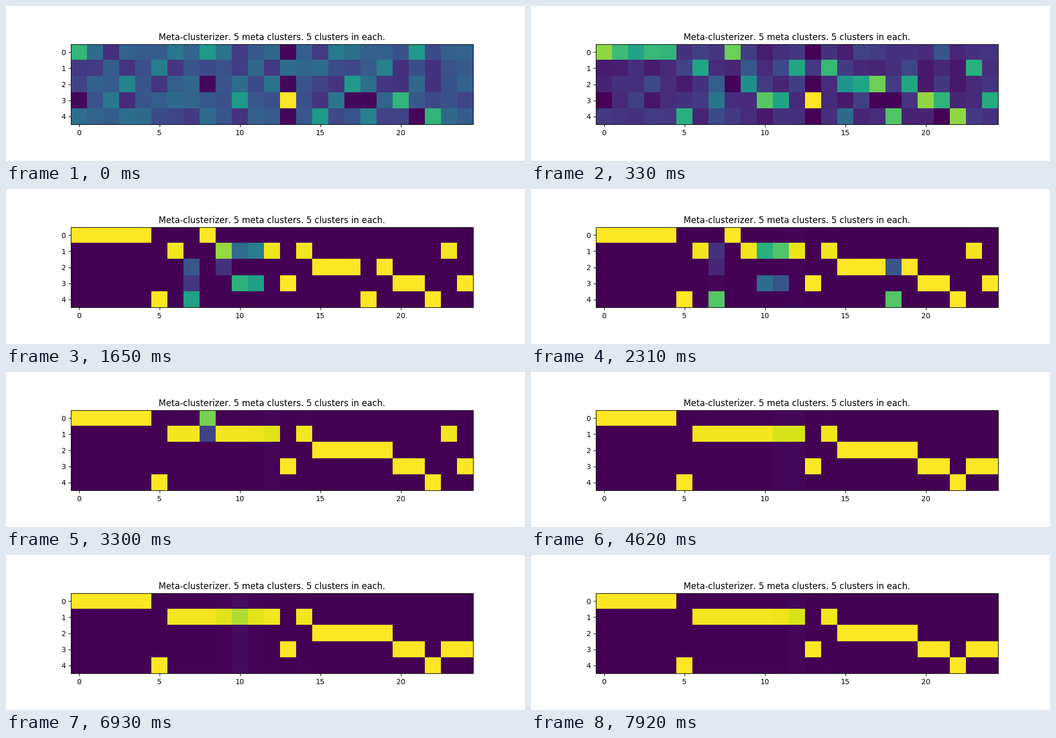
Recreate the animation shown at these times as a matplotlib script. Size 1000 px wide and 300 px high, loop 8 s.

```python
import numpy as np
import matplotlib.pyplot as plt
from matplotlib.animation import FuncAnimation

LOOP_MS = 8000
INTERVAL = 40
STEP_MS = 330
ROWS, COLS = 5, 25
COLUMN_SUM = 1.41  # of the untrained weights, in colour range units
FORMED = 3  # step at which the clusters have formed

plt.rcParams["text.kerning_factor"] = 6

# Standout (row, column) cells before training, by weight.
STANDOUT = {
    1.00: [(3, 13)],
    0.66: [(0, 0), (3, 20), (4, 22)],
    0.54: [(0, 8), (0, 21), (2, 17), (3, 10), (4, 15)],
    0.02: [(3, 0), (0, 13), (4, 13), (2, 8), (2, 13), (3, 17), (3, 18),
           (4, 21)],
}

# Meta cluster of each column once the clusters have formed.
FIRST = [0] * 5 + [4, 1, 3, 0, 2, 3, 3, 1, 3, 1, 4, 2, 2, 4, 2, 3, 3, 4, 1, 3]

# Columns that change meta cluster: (column, new row, first step, last step).
MOVES = [
    (7, 2, 0, 8), (7, 4, 1, 8), (7, 1, 6.5, 10),
    (8, 1, 9, 14), (9, 1, 2, 5.5), (10, 1, 2.5, 9.5), (11, 1, 2.2, 8.7),
    (15, 2, 0, 3.6), (18, 2, 6.2, 9.2), (23, 3, 11, 13),
]

# Doubt that wanders along meta cluster 1.
DOUBT_STEPS = [3, 10, 14, 18, 24]
DOUBT_COLUMN = [12, 12, 11.5, 8, 12]
DOUBT_HEIGHT = [0, .04, .08, .22, .05]
BASE_DOUBT = .02


def untrained():
    rng = np.random.default_rng(4)
    grid = np.full((ROWS, COLS), np.nan)
    for weight, cells in STANDOUT.items():
        for cell in cells:
            grid[cell] = weight
    for column in grid.T:
        free = np.isnan(column)
        noise = rng.normal(0, .08, free.sum())
        rest = (COLUMN_SUM - np.nansum(column)) / free.sum()
        column[free] = np.clip(rest + noise - noise.mean(), .08, .46)
    return grid


def trained(step):
    grid = np.eye(ROWS)[:, FIRST]
    for col, row, begin, end in MOVES:
        moved = np.clip((step - begin) / (end - begin), 0, 1)
        grid[:, col] *= 1 - moved
        grid[row, col] += moved

    center = np.interp(step, DOUBT_STEPS, DOUBT_COLUMN)
    height = np.interp(step, DOUBT_STEPS, DOUBT_HEIGHT)
    bump = np.exp(-((np.arange(COLS) - center) / .85) ** 2)
    doubt = (BASE_DOUBT + height * bump) * (grid[1] > .5)
    return grid * (1 - doubt) + doubt / ROWS


START = untrained()


def grid_at(step):
    mix = min(step / FORMED, 1) ** .6
    return (1 - mix) * START + mix * trained(max(step, FORMED))


fig, ax = plt.subplots(figsize=(10, 3), dpi=100)
image = ax.imshow(START, cmap="viridis", vmin=0, vmax=1)
ax.set_title("Meta-clusterizer. 5 meta clusters. 5 clusters in each.")
ax.set_xticks(range(0, COLS, 5))
ax.set_yticks(range(ROWS))


def update(frame):
    # Use the step in force by the end of the frame.
    step = ((frame + 1) * INTERVAL - 1) // STEP_MS
    image.set_data(grid_at(step))
    return [image]


anim = FuncAnimation(fig, update, frames=LOOP_MS // INTERVAL,
                     interval=INTERVAL, repeat=True, repeat_delay=0)
plt.show()
```
